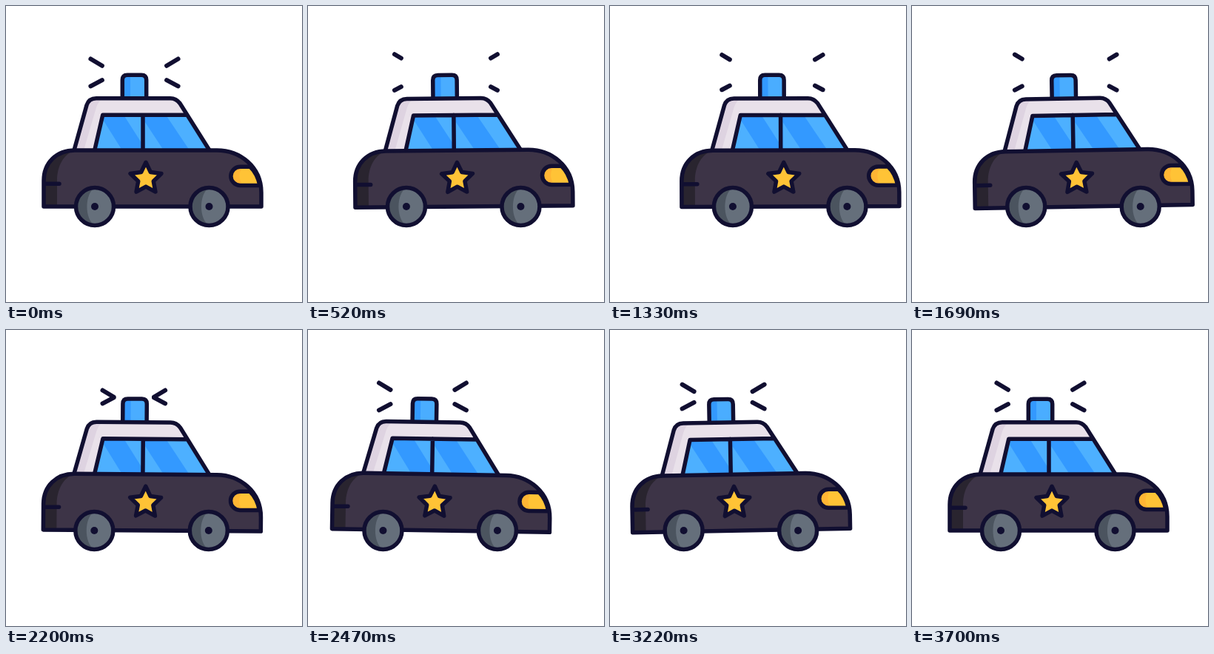
An HTML page for the animation above (3760 ms loop, 400 px wide and 400 px high).

```html
<!DOCTYPE html>
<html lang="en">
<head>
<meta charset="utf-8">
<title>Patrol car</title>
<style>
  html, body { margin: 0; width: 100%; height: 100%; overflow: hidden; background: #fff; }
  svg { display: block; width: 100vw; height: 100vh; }
  .ink { stroke: #110f31; stroke-width: 5.5; stroke-linecap: round; stroke-linejoin: round; }
  .line { fill: none; }
  #rays { stroke-width: 6; }
</style>
</head>
<body>
<svg viewBox="0 0 400 400">
  <defs>
    <g id="wheel">
      <circle r="25.5" fill="#656f7b"/>
      <path d="M0-25A25 25 0 0 0 0 25C-14 18-14-18 0-25Z" fill="#4b545f"/>
      <circle class="ink line" r="25.5"/>
      <circle r="5" fill="#110f31"/>
    </g>
  </defs>
  <g id="car">
    <g id="rays" class="ink line"></g>
    <g id="body">
      <!-- beacon -->
      <path d="M157.300 125V100Q157.300 93.200 164 93.200H183Q189.700 93.200 189.700 100V125Z" fill="#4aadff"/>
      <path d="M157.300 125V100Q157.300 93.200 164 93.200H168V125Z" fill="#3399ff"/>
      <path class="ink line" d="M157.300 125V100Q157.300 93.200 164 93.200H183Q189.700 93.200 189.700 100V125"/>
      <!-- cabin -->
      <path d="M92 195L109 134Q112 124.700 122 124.700H222Q230 124.700 235 131.500L275 195Z" fill="#e9e1ea"/>
      <path d="M92 195L109 134Q112 124.700 122 124.700H131Q125 128 122 137L105 195Z" fill="#ded3e1"/>
      <path d="M119.700 195L130.700 147.300H244L275 195Z" fill="#3399ff"/>
      <path d="M119.700 195L130 152L157 195ZM159 147.300H185V188ZM188 157L213 195H188ZM216 147.300H244L275 195H248Z" fill="#4db0ff"/>
      <path class="ink line" d="M92 195L109 134Q112 124.700 122 124.700H222Q230 124.700 235 131.500L275 195M119.700 195L130.700 147.300H244M185 147.300V195"/>
      <!-- shell -->
      <path d="M51 271V236C51 212 68 195 93 195H285C316 195 345 217 345 252V271Z" fill="#3d3447"/>
      <path d="M51 271V236C51 212 68 195 93 195C78 200 69 216 69 236V271Z" fill="#29242f"/>
      <path class="ink line" d="M51 271V236C51 212 68 195 93 195H285C316 195 345 217 345 252V271ZM51 240.300H72"/>
      <!-- headlight -->
      <path d="M330 217.300H316.500A12.600 12.600 0 0 0 316.500 242.500H343C341 233 337 224 330 217.300Z" fill="#ffc336"/>
      <path d="M320 217.300H316.500A12.600 12.600 0 0 0 316.500 242.500H320Q311 230 320 217.300Z" fill="#ffb534"/>
      <path class="ink line" d="M330 217.300H316.500A12.600 12.600 0 0 0 316.500 242.500H343C341 233 337 224 330 217.300Z"/>
      <!-- badge -->
      <path id="star" class="ink" fill="#ffc336"/>
    </g>
    <use href="#wheel" x="120" y="271"/>
    <use href="#wheel" x="274.500" y="271"/>
  </g>
</svg>
<script>
const LOOP = 3760, HOLD = 130, STEP = 30, LAST = 120;
const TILT = 1.05, TILT_PERIOD = 10.15, TILT_CYCLES = 11;
const RAY_PERIOD = 12.15, RAY_CYCLES = 9, RAY_REST = 0.38;

const $ = id => document.getElementById(id);
const car = $("car"), body = $("body");

// step and horizontal offset, eased between neighbours
const drive = [[0, 0], [40, 46], [93, -32], [120, 0]];

// inner end to outer end of each ray
const rays = [
  [147, 91, 102, 64], [147, 91, 102, 115],
  [200, 91, 245, 64], [200, 91, 245, 115]
].map(ends => {
  const el = document.createElementNS("http://www.w3.org/2000/svg", "path");
  $("rays").append(el);
  return { el, ends };
});

$("star").setAttribute("d", "M" + Array.from({ length: 10 }, (_, i) => {
  const r = i % 2 ? 10.8 : 22, a = i * Math.PI / 5;
  return `${(189 + r * Math.sin(a)).toFixed(2)} ${(233.3 - r * Math.cos(a)).toFixed(2)}`;
}).join("L") + "Z");

function offsetAt(n) {
  const i = Math.max(1, drive.findIndex(k => k[0] >= n));
  const [n0, x0] = drive[i - 1], [n1, x1] = drive[i];
  const u = (n - n0) / (n1 - n0);
  return x0 + (x1 - x0) * u * u * (3 - 2 * u);
}

// triangle wave: 0, 1, 0, -1, 0; rests after the given cycles
function swing(n, period, cycles) {
  const c = n / period;
  if (c >= cycles) return 0;
  const p = (c + 0.25) % 1;
  return 1 - 4 * Math.abs(p - 0.5);
}

function draw(n) {
  car.setAttribute("transform", `translate(${offsetAt(n)} 0)`);
  body.setAttribute("transform", `rotate(${-TILT * swing(n, TILT_PERIOD, TILT_CYCLES)} 198 271)`);

  const w = swing(n, RAY_PERIOD, RAY_CYCLES);
  const tail = RAY_REST + w * (w > 0 ? 1 - RAY_REST : RAY_REST);
  const head = Math.min(1, 0.33 + 1.25 * tail - 0.56 * tail * tail);
  for (const { el, ends: [x0, y0, x1, y1] } of rays) {
    const at = s => `${x0 + (x1 - x0) * s} ${y0 + (y1 - y0) * s}`;
    el.setAttribute("d", `M${at(tail)}L${at(Math.max(head, tail + 0.001))}`);
  }
}

let start;
function tick(now) {
  start ??= now;
  const t = (now - start) % LOOP;
  draw(t < HOLD ? 0 : Math.min(LAST, Math.floor((t - HOLD) / STEP) + 1));
  requestAnimationFrame(tick);
}
draw(0);
requestAnimationFrame(tick);
</script>
</body>
</html>
```
